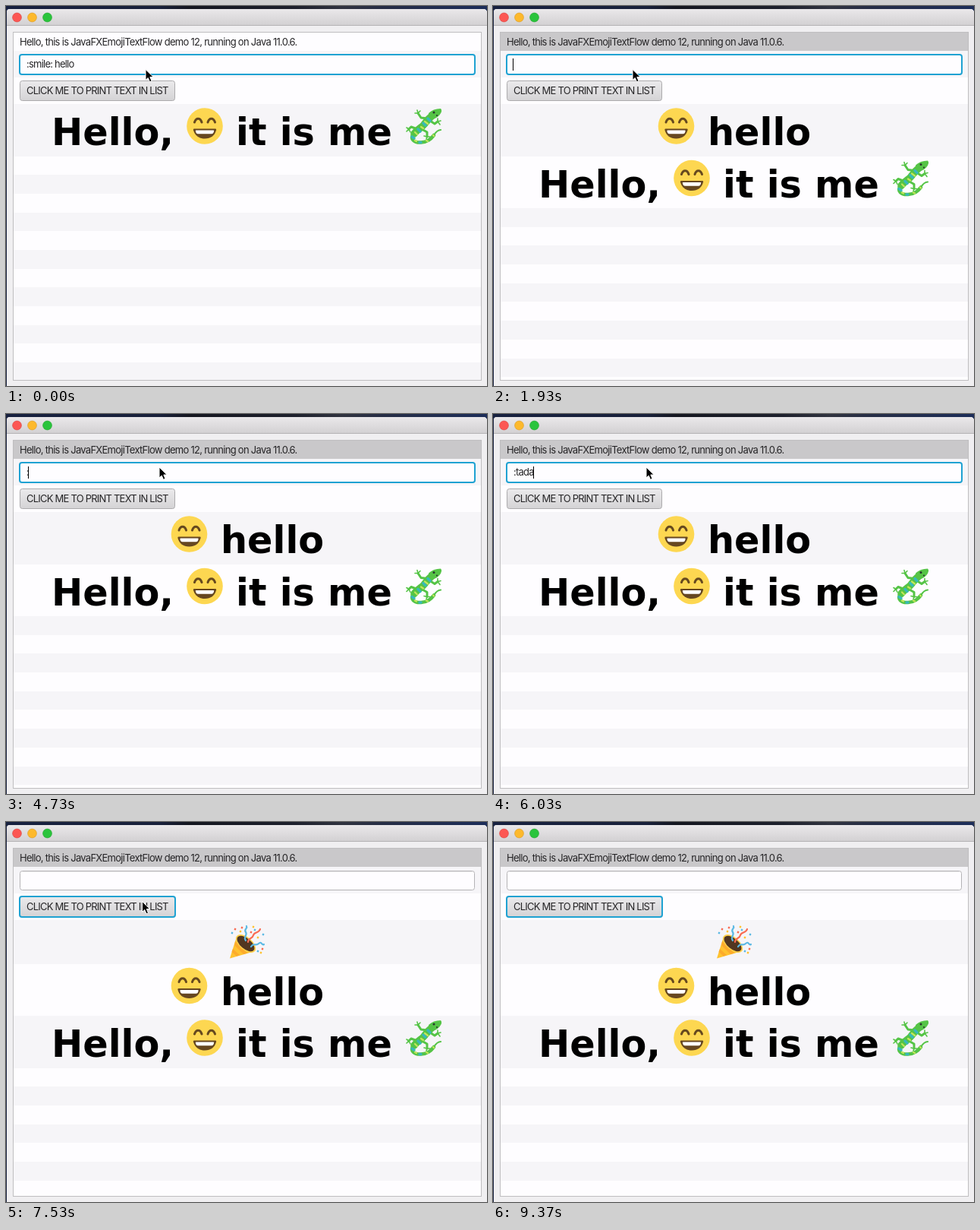
An HTML page for the animation above (9.41 s loop, 634 by 500 pixels).

```html
<!DOCTYPE html>
<html lang="en">
<head>
<meta charset="utf-8">
<title>Emoji text flow</title>
<style>
  html, body { margin: 0; width: 100%; height: 100%; overflow: hidden; background: #f0eff1; }
  svg { display: block; width: 634px; height: 500px; }
  .ui { font: 13px Inter, Roboto, sans-serif; letter-spacing: -0.78px; fill: #262527; white-space: pre; }
  .label { letter-spacing: -0.72px; }
  .big { font: bold 49.3px "DejaVu Sans", sans-serif; fill: #000; }
  .line { fill: none; stroke-linecap: round; stroke-linejoin: round; }
</style>
</head>
<body>
<svg viewBox="0 0 634 500">
  <defs>
    <linearGradient id="desk">
      <stop offset="0" stop-color="#17213f"/><stop offset=".32" stop-color="#18203a"/>
      <stop offset=".38" stop-color="#14161f"/><stop offset=".6" stop-color="#1d202c"/>
      <stop offset=".7" stop-color="#30333f"/><stop offset=".78" stop-color="#262d45"/>
      <stop offset="1" stop-color="#1c2d59"/>
    </linearGradient>
    <linearGradient id="bar" x2="0" y2="1">
      <stop offset="0" stop-color="#eae8ea"/><stop offset="1" stop-color="#d3d1d3"/>
    </linearGradient>
    <linearGradient id="btn" x2="0" y2="1">
      <stop offset="0" stop-color="#ebeaec"/><stop offset="1" stop-color="#d4d3d5"/>
    </linearGradient>

    <g id="smile">
      <circle r="23.800" fill="#fdd751"/>
      <g class="line" stroke="#66491f" stroke-width="3">
        <path d="M-13.500-5Q-12-9.800-8.700-9.800T-4-5"/>
        <path d="M4-5Q5.500-9.800 8.700-9.800T13.500-5"/>
      </g>
      <path d="M-14 3.500H14Q15.500 3.500 15 5.500C13 12.500 8 16.500 0 16.500S-13 12.500-15 5.500Q-15.500 3.500-14 3.500Z" fill="#664720"/>
      <path d="M-11.500 5.500H11.500Q12.500 5.500 12 7Q11.300 10.300 9 10.300H-9Q-11.300 10.300-12 7Q-12.500 5.500-11.500 5.500Z" fill="#fff"/>
    </g>

    <g id="lizard">
      <g class="line" stroke="#55c446">
        <path d="M11-14C5-9 3-6 0-2S-9 4-13 10" stroke-width="9.500"/>
        <path d="M-14 10C-19 17-13 22-4 21.500S9 17 13 12" stroke-width="4.500"/>
        <path d="M13 12C16 7 19 5 22 5" stroke-width="2.200"/>
        <path d="M4-10L-4-11L-8-17M8-7L14-3L18-6M-9 4L-17 1L-20 4M-3 4L4 8L4 14" stroke-width="3"/>
        <path d="M-12-17L-8-17L-9-21M-8-17L-5-20M18-6L18-10M18-6L22-7M18-6L21-2M-20 4L-23 2M-20 4L-23 7M-20 4L-18 8M4 14L0 13M4 14L3 17M4 14L8 14" stroke-width="1.600"/>
      </g>
      <path d="M6-17Q12-23 22-23Q25-20 20-14Q14-8 8-9Z" fill="#55c446"/>
      <g class="line" stroke="#38b9b9" stroke-width="3.500">
        <path d="M5-10L8-7M-1-4L2-1M-8 4L-5 7M-16 14L-13 16M-6 21.500L-4 21.500"/>
      </g>
      <g class="line" stroke="#c3e65a" stroke-width="2.200">
        <path d="M1-6L5-3M-4 1L-1 3M-12 8L-9 11M-12 19L-10 20M3 19L5 20M12 12L13 13"/>
      </g>
      <circle cx="13" cy="-18" r="1.500" fill="#28372d"/>
      <circle cx="17" cy="-14" r="1.100" fill="#28372d"/>
    </g>

    <g id="tada">
      <path d="M-23 21.500L-14-7Q-5-9 4 0T10 12Z" fill="#ffc22f"/>
      <path d="M-19 9L-10 17L-14 18.500L-20.500 13ZM-16-1L0 14.500L-5 16L-17 4Z" fill="#fcab2c"/>
      <ellipse cx="-2" cy="2" rx="15.500" ry="8.500" transform="rotate(40 -2 2)" fill="#ffd04a"/>
      <ellipse cx="-2" cy="2" rx="13.700" ry="7" transform="rotate(40 -2 2)" fill="#513621"/>
      <g class="line" stroke-width="2.200">
        <path d="M-2-2C-6-7 1-9-2-13S1-18-1-21" stroke="#5bb9e4"/>
        <path d="M1 0C1-6 7-4 8-9S15-11 17-17" stroke="#f96b52"/>
        <path d="M5 6C9 0 11 6 15 2S19 5 22 3" stroke="#5bb9e4"/>
      </g>
      <g id="bits"></g>
    </g>
  </defs>

  <rect width="634" height="500" fill="url(#desk)"/>
  <path d="M1 500V8Q1 4 5 4H629Q634 4 634 9V500Z" fill="#f0eff1"/>
  <path d="M1 25V8Q1 4 5 4H629Q634 4 634 9V25Z" fill="url(#bar)"/>
  <path d="M1 25.500H634" stroke="#b4b2b4"/>
  <g stroke-width=".7">
    <circle cx="14.500" cy="15" r="5.900" fill="#fc5753" stroke="#df4744"/>
    <circle cx="34.500" cy="15" r="5.900" fill="#fdb92c" stroke="#dd9e2a"/>
    <circle cx="54.500" cy="15" r="5.900" fill="#2ac43c" stroke="#23a830"/>
  </g>

  <rect x="9.500" y="34.500" width="617" height="458" fill="#fefdff" stroke="#bfbec0"/>
  <g id="rows"></g>
  <text class="ui label" x="18" y="51.500">Hello, this is JavaFXEmojiTextFlow demo 12, running on Java 11.0.6.</text>

  <rect id="field" rx="3" fill="#fefdff"/>
  <path id="inset" d="M20 65.500H616" stroke="#e9e8ea"/>
  <text class="ui" id="typed" x="27" y="81"></text>
  <path id="caret" d="M0 69V85" stroke="#000"/>

  <rect id="button" rx="3" fill="url(#btn)"/>
  <text class="ui" x="27" y="116">CLICK ME TO PRINT TEXT IN LIST</text>

  <g id="list"></g>
  <path id="mouse" d="M0 0V14L3.200 11L5.500 16.300L8 15.200L5.800 10H10.200Z" fill="#000" stroke="#fff" stroke-width="1" stroke-linejoin="round"/>
</svg>
<script>
const LOOP = 9410, ENTER = 600, CLICK = 7100;
const $ = id => document.getElementById(id);
const set = (el, attrs) => { for (const k in attrs) el.setAttribute(k, attrs[k]); };
const use = (id, x, y) => `<use href="#${id}" x="${x}" y="${y}"/>`;
const big = (x, s) => `<text class="big" x="${x}" y="54">${s}</text>`;

const items = {
  greet: { h: 68.5, body: big(60, 'Hello,') + use('smile', 262, 29) + big(303, 'it is me') + use('lizard', 551, 29) },
  hello: { h: 68.5, body: use('smile', 241.5, 29) + big(283, 'hello') },
  party: { h: 57.5, body: use('tada', 318, 29) }
};
const lists = [['greet'], ['hello', 'greet'], ['party', 'hello', 'greet']];

// Text in the field from each moment on
const typing = [
  [0, ':smile: hello'], [ENTER, ''], [3260, ':'], [5200, ':t'], [5450, ':ta'],
  [5650, ':tad'], [5900, ':tada'], [6200, ':tada:'], [CLICK, '']
];
// Pointer stops: time, x, y
const stops = [
  [0, 184, 83.5], [2250, 184, 83.5], [2650, 202, 70], [6450, 202, 70],
  [6900, 179.5, 104.5], [7950, 179.5, 104.5], [8600, 300, 515], [LOOP, 300, 515]
];

const dots = [
  [-16, -17, 0], [-20, -12, 1], [-9, -14, 2], [8, -20, 2], [10, -16, 1], [21, -10, 1],
  [14, -6, 2], [20, 9, 0], [14, 12, 1], [5, -13, 0], [18, 14, 2], [-7, -19, 0]
];
const hues = ['#f96b52', '#5bb9e4', '#ffc22f'];
$('bits').innerHTML = dots.map(([x, y, c]) =>
  `<rect x="${x - 1.2}" y="${y - 1.2}" width="2.4" height="2.4" rx=".5" fill="${hues[c]}" transform="rotate(30 ${x} ${y})"/>`).join('');

let shown = -1;
function drawList(stage) {
  if (stage === shown) return;
  shown = stage;
  const heights = [24, 35, 35, ...lists[stage].map(n => items[n].h)];
  let rows = '', y = 35;
  for (let i = 0; y < 492; i++) {
    const end = Math.min(492, y + (heights[i] || 24.7));
    const top = Math.round(y), fill = i === 0 && stage ? '#c9c8ca' : i % 2 ? '#f6f5f8' : '#fefdff';
    rows += `<rect x="10" y="${top}" width="616" height="${Math.round(end) - top}" fill="${fill}"/>`;
    y = end;
  }
  $('rows').innerHTML = rows;
  y = 129;
  $('list').innerHTML = lists[stage].map(n => {
    const row = `<g transform="translate(0 ${y})">${items[n].body}</g>`;
    y += items[n].h;
    return row;
  }).join('');
}

function border(el, x, y, w, h, focused, plain) {
  const d = focused ? 0 : 0.5;
  set(el, {
    x: x + d, y: y + d, width: w - 2 * d, height: h - 2 * d,
    stroke: focused ? '#1fa2d2' : plain, 'stroke-width': focused ? 2 : 1
  });
}

function pointer(t) {
  const i = stops.findIndex(s => s[0] > t);
  const [t0, x0, y0] = stops[i - 1], [t1, x1, y1] = stops[i];
  const u = (t - t0) / (t1 - t0), e = u * u * (3 - 2 * u);
  return [x0 + (x1 - x0) * e, y0 + (y1 - y0) * e];
}

function draw(t) {
  drawList(t < ENTER ? 0 : t < CLICK ? 1 : 2);

  const inField = t < CLICK;
  border($('field'), 18, 64, 600, 26, inField, '#b5b4b6');
  border($('button'), 18, 98, 205, 27, !inField, '#acabad');
  $('inset').style.display = inField ? 'none' : '';

  const [since, text] = typing.filter(k => k[0] <= t).pop();
  const typed = $('typed');
  if (typed.textContent !== text) typed.textContent = text;
  const lit = since ? (t - since) % 1000 < 500 : t >= 150;
  const x = text ? Math.round(27 + typed.getComputedTextLength()) - 0.5 : 26.5;
  set($('caret'), { transform: `translate(${x} 0)`, opacity: inField && lit ? 1 : 0 });

  set($('mouse'), { transform: `translate(${pointer(t)})` });
}

const start = performance.now();
function tick() {
  draw((performance.now() - start) % LOOP);
  requestAnimationFrame(tick);
}
tick();
</script>
</body>
</html>
```
